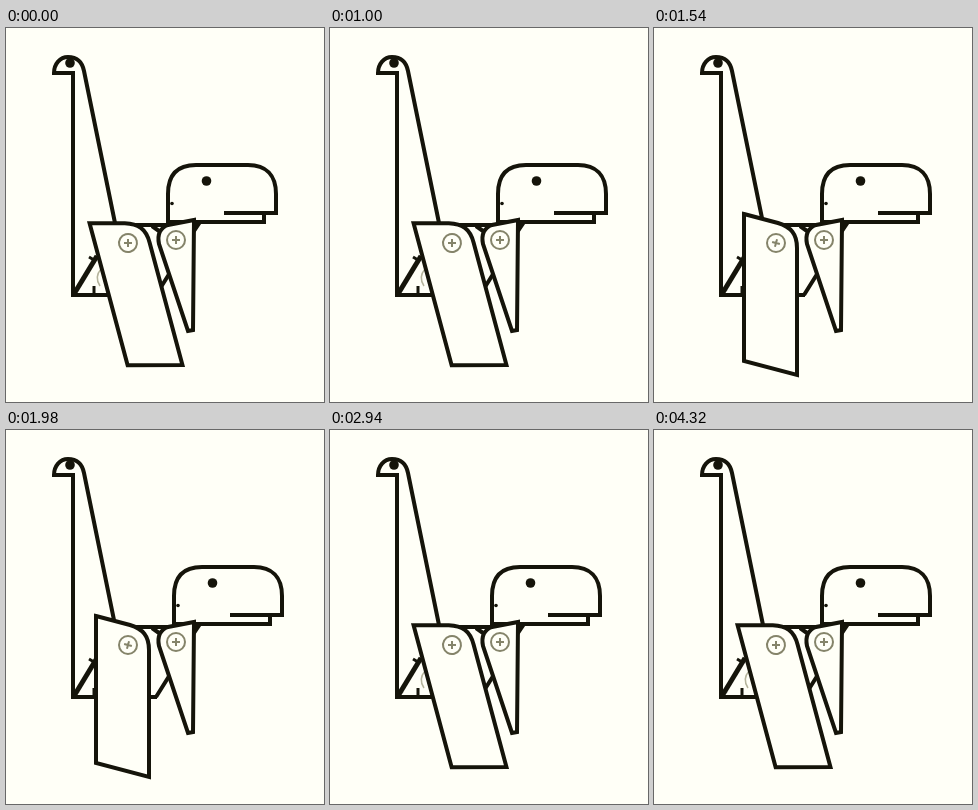
An HTML page for the animation above (4.42 s loop, 318 px wide and 374 px high).

```html
<!DOCTYPE html>
<html>
<head>
<meta charset="utf-8">
<title>Paper dinosaur</title>
<style>
html, body { margin: 0; width: 100%; height: 100%; overflow: hidden; background: #fffff7; }
svg { display: block; width: 318px; height: 374px; }
path { fill: none; stroke: #15140a; stroke-width: 4; }
.solid { fill: #fffff7; }
.screw { fill: none; stroke: #85846a; stroke-width: 2; }
.dot { fill: #15140a; }
</style>
</head>
<body>
<svg viewBox="0 0 318 374">
  <!-- neck and tail -->
  <path d="M109 195L78 43C76 33 70 29 62 29C54 29 48 36 48 45H67V267H151"/>
  <circle class="dot" cx="64" cy="35" r="4.8"/>
  <path d="M68 266L91 228" stroke-width="5" style="stroke-width:5"/>
  <path d="M83 229L88 232M88 258V267" style="stroke-width:3"/>
  <path class="screw" d="M95 241Q88 249 94 258" style="stroke:#b5b49c;stroke-width:1.5"/>
  <!-- body -->
  <path d="M108 197H192L186 206M146 198L153 203M150 267L165 243"/>
  <g id="head">
    <path class="solid" d="M162 196V166C162 147 171 137 190 137H242C260 137 270 147 270 166V185H258V194H162"/>
    <path d="M218 185H270"/>
    <circle class="dot" cx="200.5" cy="153" r="4.8"/>
    <circle class="dot" cx="166" cy="175.500" r="1.8"/>
  </g>
  <!-- arm -->
  <path class="solid" d="M188 192L187 302L182 303L153 216C151 206 154 200 162 197Z"/>
  <g class="screw">
    <circle cx="170" cy="212" r="9"/>
    <path class="screw" d="M166 212H174M170 208V216"/>
  </g>
  <g id="leg">
    <path class="solid" d="M90 186L124 195C137 199 143 206 143 220V347L90 333Z"/>
    <g class="screw">
      <circle cx="122" cy="215" r="9"/>
      <path class="screw" d="M118 215H126M122 211V219" transform="rotate(15 122 215)"/>
    </g>
  </g>
</svg>
<script>
const LOOP = 4420;
const head = document.getElementById('head');
const leg = document.getElementById('leg');
const within = (t, from, to) => t >= from && t < to;

function draw() {
  const t = performance.now() % LOOP;
  const forward = within(t, 980, 2100) || t >= 3780;
  const upright = within(t, 1540, 2660);
  head.setAttribute('transform', `translate(${forward ? 6 : 0} 0)`);
  leg.setAttribute('transform', `rotate(${upright ? 0 : -15} 122 215)`);
  requestAnimationFrame(draw);
}
draw();
</script>
</body>
</html>
```
